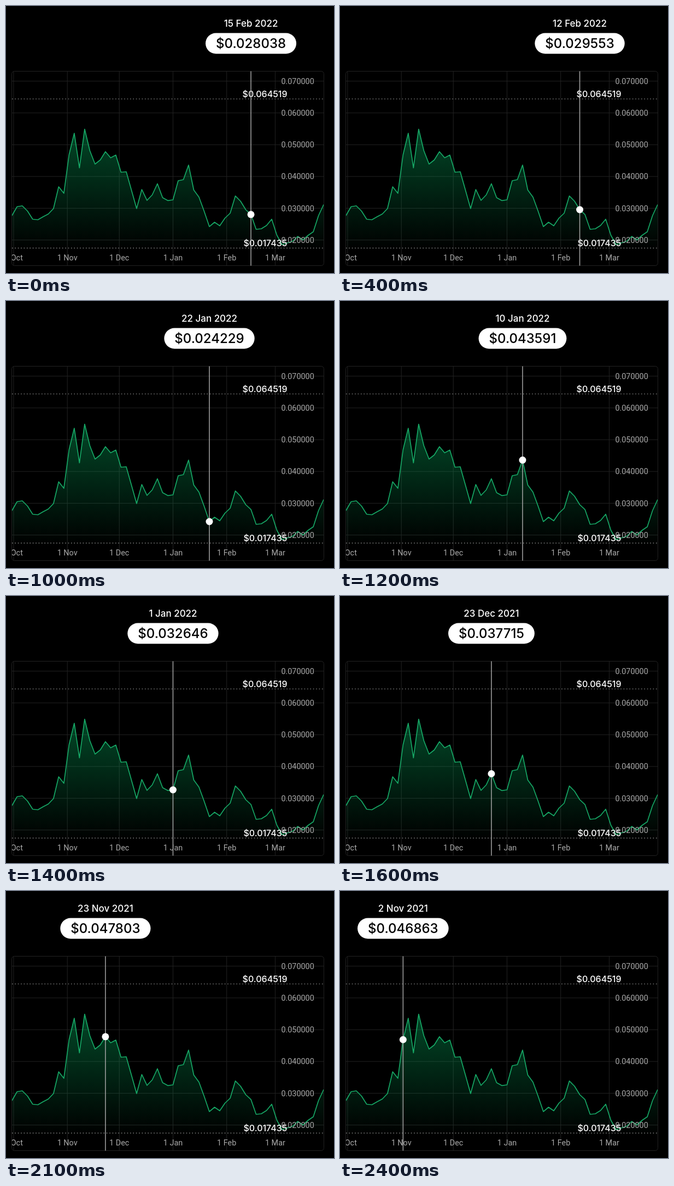
Recreate the animation shown at these times as an HTML page. Size 600 px wide and 489 px high, loop 2.5 s.

```html
<!DOCTYPE html>
<html lang="en">
<head>
<meta charset="utf-8">
<title>Price history</title>
<style>
  html, body { margin: 0; width: 100%; height: 100%; overflow: hidden; background: #000; }
  svg { display: block; width: 100%; height: 100%; }
  text { font-family: Inter, sans-serif; font-weight: 500; fill: #fff; }
  .axis text { font: 400 14.4px Roboto, sans-serif; fill: #a9a9a9; }
  .grid { fill: none; stroke: #222; stroke-width: 1; }
  .limit { stroke: #777; stroke-width: 1.6; stroke-dasharray: 1.6 3.8; }
  .mid { text-anchor: middle; }
  .bound { font-size: 16px; text-anchor: end; }
</style>
</head>
<body>
<svg viewBox="0 0 600 489">
  <defs>
    <linearGradient id="fade" gradientUnits="userSpaceOnUse" x1="0" y1="224" x2="0" y2="448">
      <stop offset="0" stop-color="#05a85c" stop-opacity=".43"/>
      <stop offset="1" stop-color="#05a85c" stop-opacity="0"/>
    </linearGradient>
    <clipPath id="plot"><rect x="10.5" y="119.5" width="571" height="356" rx="5"/></clipPath>
  </defs>
  <g clip-path="url(#plot)">
    <path id="grid" class="grid"/>
    <path id="area" fill="url(#fade)"/>
    <path id="line" fill="none" stroke="#16a765" stroke-width="1.7" stroke-linejoin="round"/>
    <path class="limit" d="M11 170.3H581M11 443.4H581"/>
    <g id="axis" class="axis"></g>
  </g>
  <rect class="grid" x="10.5" y="119.5" width="571" height="356" rx="5"/>
  <text class="bound" x="514.5" y="166.8">$0.064519</text>
  <text class="bound" x="514.5" y="440.4">$0.017435</text>
  <path id="cursor" stroke="#a6a6a6" stroke-width="1.5"/>
  <circle id="dot" r="6.5" fill="#fff"/>
  <text id="date" class="mid" y="38.3" font-size="17"></text>
  <rect id="pill" y="49.5" height="38" rx="19" fill="#fff"/>
  <text id="price" class="mid" y="77.2" font-size="24" style="fill:#000"></text>
</svg>
<script>
const $ = id => document.getElementById(id);
const DAY = 864e5, START = Date.UTC(2021, 8, 30);
const MONTHS = 'Jan Feb Mar Apr May Jun Jul Aug Sep Oct Nov Dec'.split(' ');

// One price per three days, in millionths of a dollar
const prices = [
  27663, 30498, 30756, 29124, 26546, 26374, 27319, 28178, 29897, 36770,
  34708, 46863, 53608, 42697, 54896, 48110, 43900, 45189, 47803, 45876,
  46735, 41323, 41494, 35739, 29897, 35910, 32474, 34192, 37715, 33333,
  32414, 32646, 38660, 39003, 43591, 35739, 33505, 29038, 24229, 25601,
  24484, 26890, 28436, 33857, 32216, 29553, 28038, 23368, 23539, 24570,
  26546, 21478, 18557, 19072, 19587, 21134, 20017, 21478, 22594, 27663, 31185
];
// Selected price for each 100 ms step of the drag
const drag = [46, 46, 46, 46, 45, 44, 43, 42, 40, 39, 38, 36, 34,
  33, 31, 30, 28, 26, 24, 22, 20, 18, 16, 13, 11];
const STEP = 100;

const xOf = day => 10.8 + day * 3.1685;
const yOf = price => 545 - price * 0.00582;
const usd = price => (price / 1e6).toFixed(6);

function dayLabel(day, withYear) {
  const d = new Date(START + day * DAY);
  const label = d.getUTCDate() + ' ' + MONTHS[d.getUTCMonth()];
  return withYear ? label + ' ' + d.getUTCFullYear() : label;
}

function buildChart() {
  let grid = '', labels = '';
  for (let m = 9; m <= 14; m++) {
    const day = (Date.UTC(2021, m, 1) - START) / DAY, x = xOf(day);
    grid += `M${x} 120V475`;
    labels += `<text class="mid" x="${x}" y="465.6">${dayLabel(day)}</text>`;
  }
  for (let p = 70000; p >= 20000; p -= 10000) {
    const y = yOf(p);
    grid += `M11 ${y}H581`;
    labels += `<text x="503.4" y="${y + 5.2}">${usd(p)}</text>`;
  }
  const line = 'M' + prices.map((p, i) => xOf(i * 3) + ' ' + yOf(p)).join('L');
  $('grid').setAttribute('d', grid);
  $('axis').innerHTML = labels;
  $('line').setAttribute('d', line);
  $('area').setAttribute('d', line + 'V448H10.8Z');
}

function select(i) {
  const x = xOf(i * 3), price = $('price'), pill = $('pill');
  $('cursor').setAttribute('d', `M${x} 119.5V475.5`);
  $('dot').setAttribute('cx', x);
  $('dot').setAttribute('cy', yOf(prices[i]));
  $('date').setAttribute('x', x);
  $('date').textContent = dayLabel(i * 3, true);
  price.setAttribute('x', x);
  price.textContent = '$' + usd(prices[i]);
  const w = price.getComputedTextLength() + 38;
  pill.setAttribute('x', x - w / 2);
  pill.setAttribute('width', w);
}

const t0 = performance.now();
function tick() {
  const t = Math.max(0, performance.now() - t0);
  select(drag[Math.floor(t / STEP) % drag.length]);
  requestAnimationFrame(tick);
}

buildChart();
tick();
</script>
</body>
</html>
```
